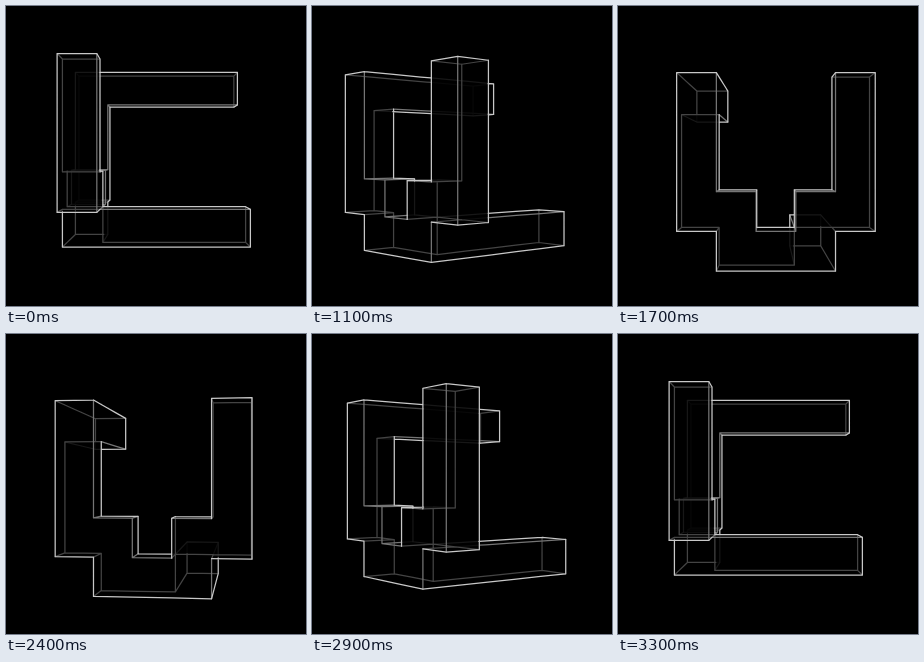
Recreate the animation shown at these times as an HTML page with a canvas. Size 300 px wide and 300 px high, loop 3.4 s.

```html
<!DOCTYPE html>
<html lang="en">
<head>
<meta charset="utf-8">
<title>Turning block figure</title>
<style>
  html, body { margin: 0; height: 100%; overflow: hidden; background: #000; }
  canvas { display: block; }
</style>
</head>
<body>
<canvas id="stage" width="300" height="300"></canvas>
<script>
const ctx = document.getElementById("stage").getContext("2d");
const LOOP = 3400, STEP = 100, TURN = 975;
const SIZE = 5, HALF = SIZE / 2, CENTER = 150.4, FOCAL = 703, DISTANCE = 20.2, SAMPLES = 16;
const FRONT = ["#...#", "#...#", "#...#", "##.##", ".###."];

// A flat front shape plus two bars running from front to back.
function solid(x, y, z) {
  if (Math.min(x, y, z) < 0 || Math.max(x, y, z) >= SIZE) return false;
  return (z === 4 && FRONT[y][x] === "#") || (x === 0 && y === 0) || (x === 3 && y === 4);
}

// Unit edges where the surface bends; flat seams between cells are left out.
function findEdges() {
  const edges = [];
  for (let axis = 0; axis < 3; axis++) {
    const u = (axis + 1) % 3, v = (axis + 2) % 3;
    for (let a = 0; a < SIZE; a++)
      for (let b = 0; b <= SIZE; b++)
        for (let c = 0; c <= SIZE; c++) {
          const filled = (du, dv) => {
            const cell = [];
            cell[axis] = a;
            cell[u] = b - du;
            cell[v] = c - dv;
            return solid(...cell);
          };
          const p = filled(0, 0), q = filled(1, 0), r = filled(0, 1), s = filled(1, 1);
          const flat = (p === q && r === s) || (p === r && q === s);
          if (flat) continue;
          const start = [];
          start[axis] = a;
          start[u] = b;
          start[v] = c;
          edges.push({ axis, u, v, start, filled });
        }
  }
  return edges;
}
const edges = findEdges();

// True when both faces at an edge look towards the eye, so it is no contour.
function facesEye({ u, v, start, filled }, eye) {
  const du = eye[u] > start[u] ? 0 : 1, dv = eye[v] > start[v] ? 0 : 1;
  return !filled(du, dv) && filled(1 - du, dv) === filled(du, 1 - dv);
}

// Number of surfaces between a point and the eye.
function layers(point, eye) {
  let count = 0;
  for (let axis = 0; axis < 3; axis++) {
    const span = eye[axis] - point[axis];
    for (let plane = 0; plane <= SIZE; plane++) {
      const t = (plane - point[axis]) / span;
      if (!(t > 1e-5 && t < 1)) continue;
      const cell = point.map((n, i) => Math.floor(n + (eye[i] - n) * t));
      cell[axis] = plane;
      const ahead = solid(...cell);
      cell[axis]--;
      if (ahead !== solid(...cell)) count++;
    }
  }
  return count;
}

const ramp = (time, start) => Math.min(1, Math.max(0, (time - start) / TURN));

function draw(time) {
  const turn = ramp(time, 654) - ramp(time, 2325);
  const angle = (1 - turn) * Math.PI / 2;
  const cos = Math.cos(angle), sin = Math.sin(angle);
  const shiftX = 0.19 * cos, shiftY = -0.09 + 0.48 * turn;
  const eye = [
    HALF - shiftX * cos + DISTANCE * sin,
    HALF - shiftY,
    HALF + shiftX * sin + DISTANCE * cos
  ];

  const project = ([px, py, pz]) => {
    const x = px - HALF, z = pz - HALF;
    const scale = FOCAL / (DISTANCE - x * sin - z * cos);
    return [CENTER + (x * cos - z * sin + shiftX) * scale, CENTER + (py - HALF + shiftY) * scale];
  };

  // Lines grouped by half steps of veiling.
  const groups = [];
  for (const edge of edges) {
    const { axis, start } = edge;
    const veil = facesEye(edge, eye) ? 1 : 0;
    const along = t => start.map((n, i) => i === axis ? n + t : n);
    let from = 0, depth = layers(along(0.5 / SAMPLES), eye);
    for (let i = 1; i <= SAMPLES; i++) {
      const next = i < SAMPLES ? layers(along((i + 0.5) / SAMPLES), eye) : -1;
      if (next === depth) continue;
      (groups[depth * 2 + veil] ||= []).push([project(along(from)), project(along(i / SAMPLES))]);
      from = i / SAMPLES;
      depth = next;
    }
  }

  ctx.fillStyle = "#000";
  ctx.fillRect(0, 0, 300, 300);
  ctx.lineWidth = 1.25;
  ctx.lineCap = "round";
  for (let level = groups.length - 1; level >= 0; level--) {
    const grey = Math.round(200 * 0.34 ** (level / 2));
    ctx.strokeStyle = `rgb(${grey},${grey},${grey})`;
    ctx.beginPath();
    for (const [a, b] of groups[level] || []) {
      ctx.moveTo(...a);
      ctx.lineTo(...b);
    }
    ctx.stroke();
  }
}

let shown = -1;
function tick() {
  const time = Math.floor(performance.now() % LOOP / STEP) * STEP;
  if (time !== shown) draw(shown = time);
  requestAnimationFrame(tick);
}
tick();
</script>
</body>
</html>
```
